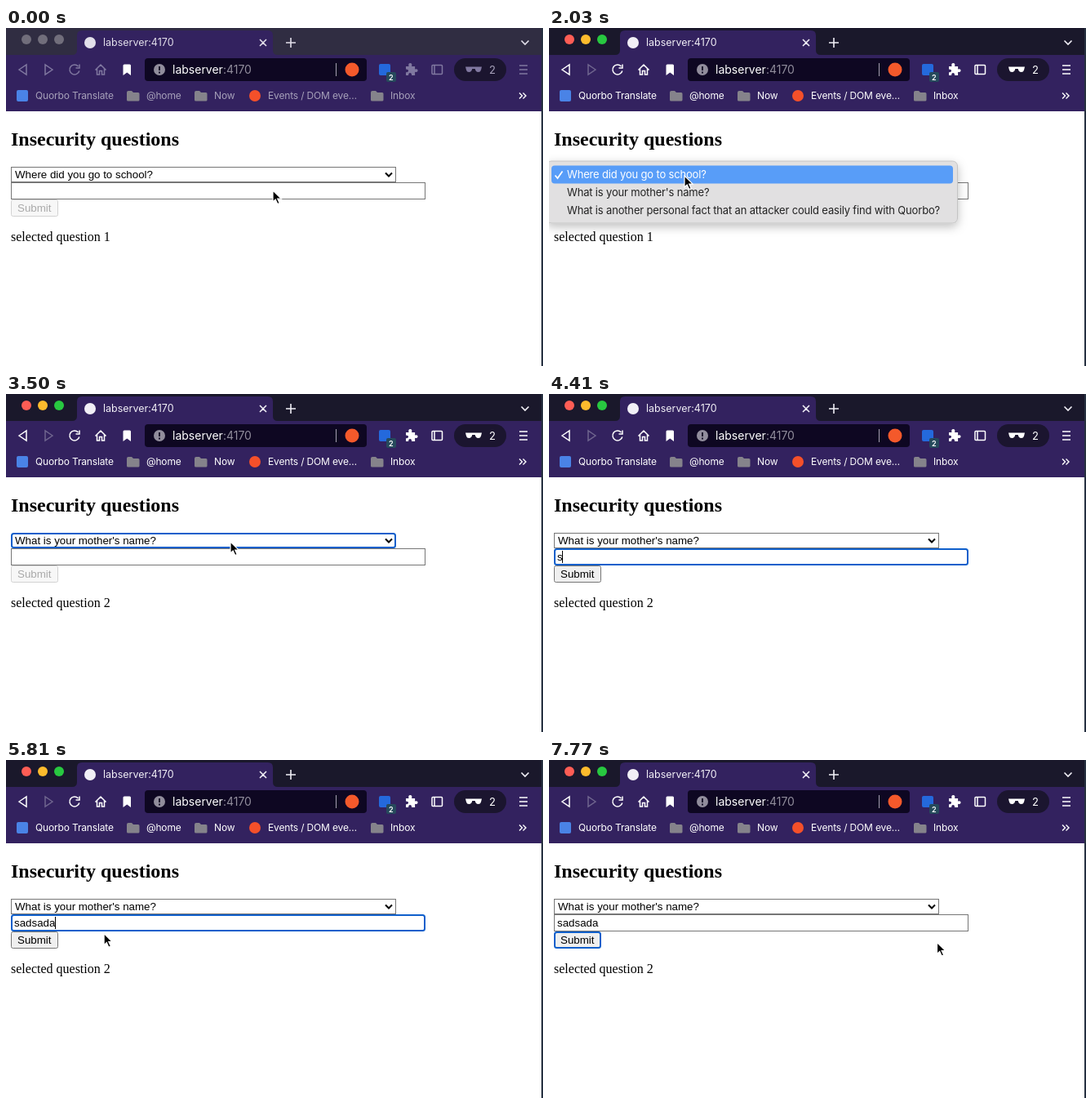
These frames come from a looping animation (658x414 px, 7.84 s). An HTML page:

```html
<!DOCTYPE html>
<html lang="en">
<head>
<meta charset="utf-8">
<title>Insecurity questions</title>
<style>
  html, body { margin: 0; width: 100%; height: 100%; overflow: hidden; background: #fff; }
  svg { display: block; --strip: #1a182b; --text: #fff; --icon: #fff; --dim: #70668f; --mark: #f1eff6; }
  svg.idle { --strip: #302d42; --text: #a7a1ba; --icon: #8078a0; --dim: #8078a0; --mark: #e2dfea; }
  text { white-space: pre; }
  .ui { font-family: Inter, sans-serif; }
  .form { font: 13.333px "Liberation Sans", Arial, sans-serif; }
  .page { font-family: "Liberation Serif", "Times New Roman", serif; }
  .bookmarks { font-size: 12px; letter-spacing: -.16px; fill: var(--text); }
  .menu { font-size: 13px; letter-spacing: -.17px; fill: #222; }
  .line { fill: none; stroke: var(--icon); stroke-width: 1.5; }
</style>
</head>
<body>
<svg id="stage" width="658" height="414" viewBox="0 0 658 414">
  <defs>
    <filter id="shadow" x="-10%" y="-20%" width="120%" height="150%">
      <feDropShadow dx="0" dy="4" stdDeviation="6" flood-opacity=".25"/>
    </filter>
    <path id="folder" d="M0 2q0-2 2-2h4l2 2h6q1.500 0 1.500 1.500V11q0 1.500-1.500 1.500H1.500Q0 12.500 0 11z" fill="#85838b"/>
  </defs>
  <rect width="658" height="414" fill="#fff"/>

  <g class="ui">
    <rect width="656" height="34" fill="var(--strip)"/>
    <path d="M81 33q6 0 6-6V9q0-6 6-6h228q6 0 6 6v18q0 6 6 6h323v69H0V33z" fill="#33225f"/>
    <g id="lights"></g>
    <circle cx="103" cy="18" r="7" fill="var(--mark)"/>
    <text x="119" y="22" font-size="12.500" fill="var(--mark)">labserver:4170</text>
    <path d="M311 14l8 8m0-8l-8 8M343 18h12m-6-6v12M631.500 15.500l4.500 4.500 4.500-4.500" fill="none" stroke="var(--mark)" stroke-width="1.600"/>

    <path class="line" d="M16 51l9-6v12z"/>
    <path class="line" d="M57 51l-9-6v12z" style="stroke:var(--dim)"/>
    <path class="line" d="M88.500 47a6 6 0 1 0 1.300 5.500M90 44.500v4.500h-4.500"/>
    <path class="line" d="M109.500 51.500l6.500-6.500 6.500 6.500M111.500 50v7h3v-4.500h3v4.500h3v-7"/>
    <path d="M143.500 46q0-1.500 1.500-1.500h6.500q1.500 0 1.500 1.500v12l-4.750-3.500-4.750 3.500z" fill="#fff"/>
    <rect x="170" y="37" width="272" height="28" rx="4" fill="#0e0722"/>
    <circle cx="188" cy="51" r="7" fill="#918d9c"/>
    <path d="M188 47v5m0 1.500v2" stroke="#0e0722" stroke-width="1.800"/>
    <text x="204" y="56" font-size="14" fill="#fff">labserver<tspan fill="#918d9c">:4170</tspan></text>
    <path d="M404.500 43v16" stroke="#a5a1b0"/>
    <circle cx="424" cy="51" r="8.500" fill="#f4592b"/>
    <rect x="457" y="44" width="14" height="14" rx="2" fill="#2469dc"/>
    <rect x="466" y="54" width="12" height="12" rx="2" fill="#264a5c"/>
    <text x="469" y="63.500" font-size="9" font-weight="600" fill="#fff">2</text>
    <path d="M490 47h3.500q-1-4 1.800-4t1.800 4h4v3.500q3.500-1 3.500 1.500t-3.500 1.700V58h-4q0-3-2-3t-2 3H490v-3.800q3 0 3-1.800t-3-1.800z" fill="var(--icon)"/>
    <rect class="line" x="522" y="45.500" width="12.500" height="11" rx="1"/>
    <path class="line" d="M525 46v10"/>
    <rect x="549" y="37" width="64" height="28" rx="14" fill="#1b152f"/>
    <path d="M563 47.500h20l-1 4q-.6 2.500-3.300 2.500-3.200 0-4-4h-3.400q-.8 4-4 4-2.700 0-3.300-2.500z" fill="var(--icon)"/>
    <text x="592" y="56" font-size="13" fill="var(--text)">2</text>
    <path class="line" d="M629 46h10m-10 5h10m-10 5h10"/>

    <rect x="13" y="76" width="14" height="14" rx="2" fill="#4a83e6"/>
    <use href="#folder" x="148" y="77"/>
    <use href="#folder" x="231" y="77"/>
    <circle cx="305" cy="83" r="7" fill="#f4502a"/>
    <use href="#folder" x="447" y="77"/>
    <g class="bookmarks">
      <text x="36" y="87">Quorbo Translate</text>
      <text x="172" y="87">@home</text>
      <text x="255" y="87">Now</text>
      <text x="321" y="87">Events / DOM eve…</text>
      <text x="471" y="87">Inbox</text>
    </g>
    <path d="M629 79.500l3.500 3.500-3.500 3.500m4.500-7l3.500 3.500-3.500 3.500" fill="none" stroke="#fff" stroke-width="1.400"/>
  </g>

  <g class="page">
    <text x="6" y="144" font-size="24" font-weight="700">Insecurity questions</text>
    <text id="note" x="6" y="261" font-size="16"></text>
  </g>

  <g class="form">
    <rect id="select" fill="#fff"/>
    <text id="choice" x="11" y="184"></text>
    <path d="M465 177.500l4 4 4-4" fill="none" stroke="#000" stroke-width="2"/>
    <rect id="input" fill="#fff"/>
    <text id="answer" x="10" y="204"></text>
    <path id="caret" d="M.5 192v15" stroke="#000"/>
    <rect id="button"/>
    <text id="label" x="14" y="225">Submit</text>
  </g>

  <g id="popup" class="ui menu">
    <rect x="-3" y="163" width="503.500" height="76" rx="6" fill="#e1e0e1" stroke="#c4c4c4" filter="url(#shadow)"/>
    <rect id="bar" x="3" width="492" height="22" rx="4" fill="#589df8"/>
    <path id="check" d="M7.500 180.500l3 3.500 6-8.500" fill="none" stroke="#222" stroke-width="1.700"/>
    <text x="22" y="184">Where did you go to school?</text>
    <text x="22" y="206">What is your mother's name?</text>
    <text x="22" y="228">What is another personal fact that an attacker could easily find with Quorbo?</text>
  </g>

  <g id="dialog" class="ui">
    <rect x="104" y="65" width="447" height="149" rx="3" fill="#292a2d" filter="url(#shadow)"/>
    <text x="120" y="96" font-size="15" fill="#e8eaed">labserver:4170 says</text>
    <text x="120" y="125" font-size="13" font-weight="500" letter-spacing="-.12" fill="#e8eaed">answered question 2 (What is your mother's name?) with "sadsada"</text>
    <rect x="471" y="166" width="64" height="32" rx="16" fill="#ff967e"/>
    <text x="493.500" y="186" font-size="12" font-weight="600" fill="#ffe4dc">OK</text>
  </g>

  <rect x="656" width="2" height="414" fill="#263040"/>
  <g id="cursor">
    <path id="arrow" d="M0 0v14l3.200-3 2.500 5.600 2.500-1.100-2.500-5.400h4.500z" fill="#000" stroke="#fff" stroke-width="1.200"/>
    <path id="beam" d="M-3-8q3 0 3 2.500v11q0 2.500-3 2.500M3-8q-3 0-3 2.500v11q0 2.500 3 2.500" fill="none" stroke="#000" stroke-width="1.200"/>
  </g>
</svg>

<script>
const LOOP = 7840, STEP = 70, BLUE = '#0f5fcb', GREY = '#767676';
const QUESTIONS = ['Where did you go to school?', "What is your mother's name?"];
const ANSWER = 'sadsada';
const KEYS = [4410, 4550, 4760, 4900, 5110, 5320, 5460];
const OPEN = 1960, PICK = 2800, CHOSEN = 2940, FOCUS = 4060, SEND = 6160, ALERT = 6300, CLOSE = 6980, DONE = 7140;

// time, x, y
const PATH = [
  [0, 327, 199], [350, 325, 201], [1050, 199, 261], [1190, 197, 262], [1330, 197, 262],
  [1800, 168, 181], [2030, 166, 181], [2520, 160, 199], [2960, 160, 200], [3500, 275, 181],
  [3640, 284, 181], [3990, 290, 199], [5530, 290, 199], [5980, 40, 219], [6370, 38, 220],
  [6860, 507, 177], [7140, 507, 177], [7630, 477, 222], [LOOP, 475, 224]
];

const $ = id => document.getElementById(id);
const set = (id, attrs) => { for (const k in attrs) $(id).setAttribute(k, attrs[k]); };
const show = (id, on) => set(id, { visibility: on ? 'visible' : 'hidden' });
const between = (t, a, b) => t >= a && t < b;
const clamp = v => Math.max(0, Math.min(1, v));

const COLOURS = ['#fe5d55', '#fdbb2d', '#28c840'];
$('lights').innerHTML = COLOURS.map((c, i) => `<circle cx="${25 + 20 * i}" cy="14" r="6"/>`).join('');

function box(id, x, y, w, h, focused, edge = GREY, r = 0) {
  const inset = focused ? 1 : .5;
  set(id, {
    x: x + inset, y: y + inset, width: w - 2 * inset, height: h - 2 * inset,
    rx: focused ? 2.5 : r, stroke: focused ? BLUE : edge, 'stroke-width': 2 * inset
  });
}

function pointAt(t) {
  const i = Math.max(1, PATH.findIndex(p => p[0] > t));
  const [t0, x0, y0] = PATH[i - 1], [t1, x1, y1] = PATH[i];
  const u = (t - t0) / (t1 - t0), e = u * u * (3 - 2 * u);
  return [x0 + (x1 - x0) * e, y0 + (y1 - y0) * e];
}

function drawPage(t) {
  const idle = t < OPEN, picked = t >= CHOSEN ? 1 : 0;
  const typed = KEYS.filter(k => k <= t).length, ready = typed > 0;
  $('stage').classList.toggle('idle', idle);
  [...$('lights').children].forEach((c, i) => c.setAttribute('fill', idle ? '#716e7b' : COLOURS[i]));
  $('choice').textContent = QUESTIONS[picked];
  $('note').textContent = 'selected question ' + (picked + 1);
  $('answer').textContent = ANSWER.slice(0, typed);

  box('select', 6, 170, 472, 19, between(t, OPEN, FOCUS));
  box('input', 6, 189, 508, 21, between(t, FOCUS, SEND - STEP));
  box('button', 6, 210, 58, 21, t >= DONE, ready ? GREY : '#d2d2d2', 2);
  set('button', { fill: !ready ? '#f7f7f7' : between(t, SEND - STEP, DONE) ? '#dedede' : '#efefef' });
  set('label', { fill: ready ? '#000' : '#a9a9a9' });

  const last = typed ? KEYS[typed - 1] : FOCUS;
  show('caret', between(t, FOCUS, SEND - STEP) && (t - last) % 1000 < 500);
  const width = typed ? $('answer').getComputedTextLength() : 0;
  set('caret', { transform: `translate(${Math.round(9.500 + width)} 0)` });
}

function drawOverlays(t, y) {
  const row = y < 190 ? 0 : 1, blink = between(t, PICK, PICK + STEP);
  show('popup', between(t, OPEN, 3080));
  set('popup', { opacity: 1 - clamp((t - CHOSEN) / 160) });
  set('bar', { y: 168.5 + 22 * row - (row ? .5 : 0), opacity: blink ? 0 : 1 });
  [...$('popup').querySelectorAll('text')].forEach((el, i) =>
    el.style.fill = i === row && !blink ? '#fff' : '#222');
  set('check', { stroke: row === 0 ? '#fff' : '#222' });
  show('dialog', between(t, ALERT, DONE));
  set('dialog', { opacity: Math.min(clamp((t - ALERT + STEP) / 140), 1 - clamp((t - CLOSE) / 160)) });
}

function drawCursor(t, x, y) {
  const overInput = x > 6 && x < 514 && y > 189 && y < 210;
  const beam = overInput && between(t, 3080, ALERT);
  show('cursor', !between(t, KEYS[0], 5600));
  set('cursor', { transform: `translate(${x.toFixed(1)} ${y.toFixed(1)})` });
  set('beam', { opacity: beam ? 1 : 0 });
  set('arrow', { opacity: beam ? 0 : 1 });
}

function draw(now) {
  const t = Math.floor((now % LOOP) / STEP) * STEP;
  const [x, y] = pointAt(t);
  drawPage(t);
  drawOverlays(t, y);
  drawCursor(t, x, y);
}

const start = performance.now();
function tick() {
  draw(performance.now() - start);
  requestAnimationFrame(tick);
}
tick();
</script>
</body>
</html>
```
